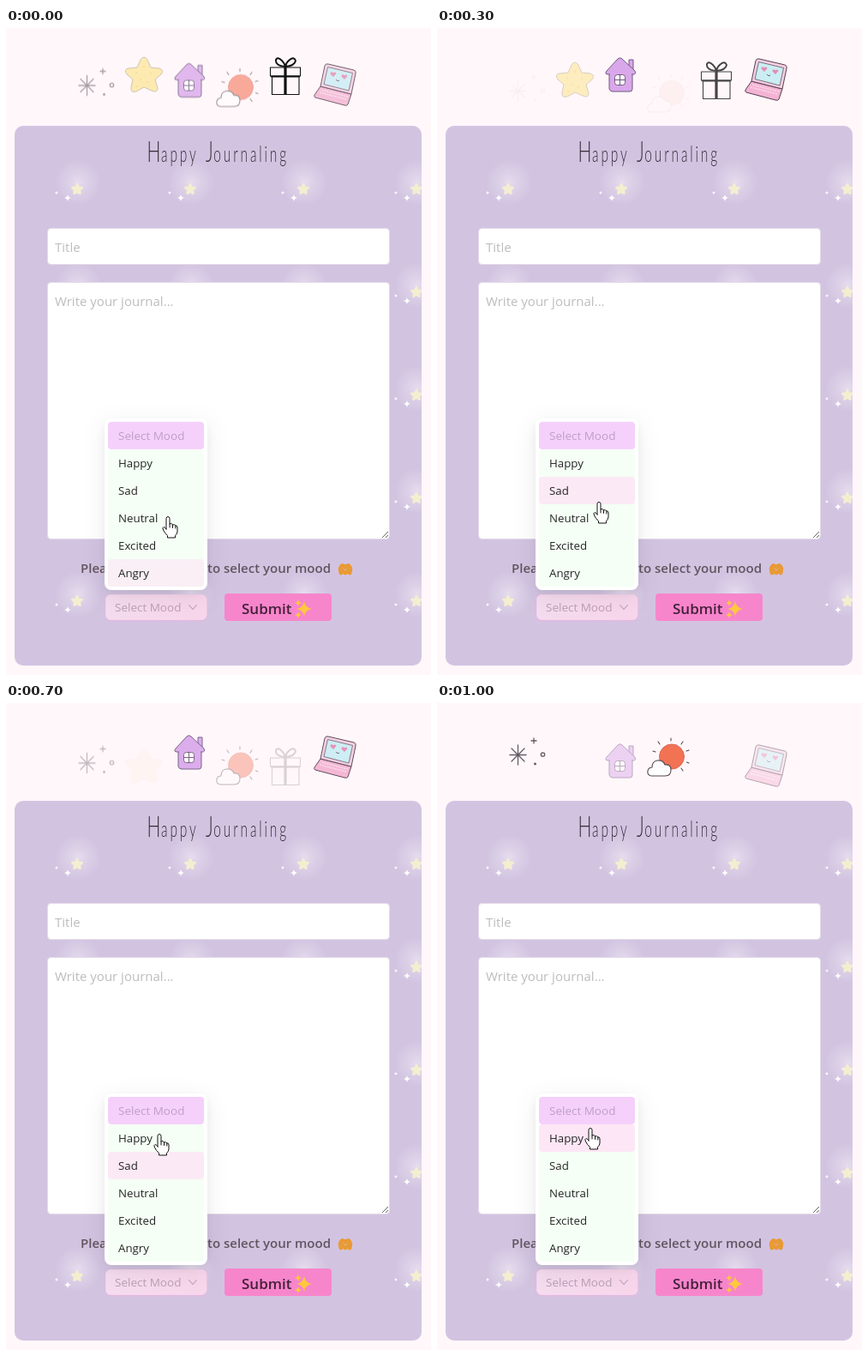
These frames come from a looping animation (496 px wide and 754 px high, 1100 ms). An HTML page:

```html
<!DOCTYPE html>
<html lang="en">
<head>
<meta charset="utf-8">
<title>Journal</title>
<style>
  html, body { margin: 0; width: 100%; height: 100%; overflow: hidden; background: #fff7fa; }
  svg { display: block; width: 496px; height: 754px; }
  text { font-family: "Open Sans", "Noto Sans", sans-serif; white-space: pre; }

  .heading {
    font: 300 25px Lato, "Open Sans", sans-serif;
    letter-spacing: 4.6px;
    fill: #352d38;
  }
  .initial { font-size: 34px; letter-spacing: 1px; }
  .hint { font-size: 15px; fill: #bdbdbd; }
  .note { font-size: 15px; font-weight: 600; fill: #63545f; }
  .submit { font-size: 17px; font-weight: 600; fill: #43203a; }
  .option { font-size: 13.3px; fill: #262626; }
  .muted { font-size: 13.5px; fill: #bd9fc6; }
  .panel {
    filter: drop-shadow(0 4px 6px rgba(0, 0, 0, .05)) drop-shadow(0 7px 14px rgba(0, 0, 0, .07));
  }
  .ink { fill: none; stroke-linecap: round; stroke-linejoin: round; }

  /* Shared float-and-fade; each icon supplies its own offsets and opacities. */
  .icon { animation: float 1.1s infinite; }
  @keyframes float {
    0%     { transform: translateY(var(--y0)); opacity: var(--o0); animation-timing-function: steps(1); }
    9.09%  { transform: translateY(var(--y1)); opacity: var(--o1); animation-timing-function: steps(2); }
    27.27% { transform: translateY(var(--y2)); opacity: var(--o2); animation-timing-function: steps(2); }
    45.45% { transform: translateY(var(--y3)); opacity: var(--o3); animation-timing-function: steps(2); }
    63.63% { transform: translateY(var(--y4)); opacity: var(--o4); animation-timing-function: steps(1); }
    72.72% { transform: translateY(var(--y5)); opacity: var(--o5); animation-timing-function: steps(2); }
    90.9%, 100% { transform: translateY(var(--y6)); opacity: var(--o6); animation-timing-function: steps(1); }
  }
  .twinkle {
    --y0: 6.5px; --y1: 9px; --y2: 13px; --y3: 14px; --y4: 9.5px; --y5: 6.5px; --y6: 0px;
    --o0: .48; --o1: .38; --o2: .04; --o3: 0; --o4: .34; --o5: .46; --o6: .85;
  }
  .star {
    --y0: 0px; --y1: 1px; --y2: 6px; --y3: 13px; --y4: 19px; --y5: 21px; --y6: 22px;
    --o0: 1; --o1: .97; --o2: .8; --o3: .47; --o4: .1; --o5: 0; --o6: 0;
  }
  .house {
    --y0: 6.5px; --y1: 3.5px; --y2: 0px; --y3: 0px; --y4: 3px; --y5: 6px; --y6: 13px;
    --o0: .8; --o1: .9; --o2: 1; --o3: 1; --o4: .93; --o5: .8; --o6: .48;
  }
  .sun {
    --y0: 6.5px; --y1: 9.5px; --y2: 13px; --y3: 14px; --y4: 10px; --y5: 7px; --y6: 0px;
    --o0: .55; --o1: .45; --o2: .05; --o3: 0; --o4: .36; --o5: .52; --o6: .95;
  }
  .gift {
    --y0: 0px; --y1: 1px; --y2: 5px; --y3: 12px; --y4: 18px; --y5: 20px; --y6: 21px;
    --o0: 1; --o1: .97; --o2: .78; --o3: .45; --o4: .16; --o5: .04; --o6: 0;
  }
  .laptop {
    --y0: 6px; --y1: 3.5px; --y2: 0px; --y3: 0px; --y4: 3px; --y5: 6px; --y6: 13px;
    --o0: .82; --o1: .9; --o2: 1; --o3: 1; --o4: .93; --o5: .82; --o6: .45;
  }

  .hover { animation: hover 1.1s step-end infinite; }
  @keyframes hover {
    0%     { transform: translateY(128px); opacity: .6; }
    9.09%  { transform: translateY(96px); opacity: .75; }
    18.18% { transform: translateY(64px); opacity: .8; }
    27.27% { transform: translateY(32px); opacity: .85; }
    45.45% { transform: translateY(32px); opacity: 1; }
    63.63% { transform: translateY(32px); opacity: .85; }
    72.72%, 100% { transform: translateY(0); opacity: 1; }
  }

  .cursor { animation: point 1.1s infinite; }
  @keyframes point {
    0%     { transform: translate(189px, 570px); animation-timing-function: steps(1); }
    9.09%  { transform: translate(189px, 553px); animation-timing-function: steps(2); }
    27.27% { transform: translate(189px, 553px); animation-timing-function: steps(2); }
    45.45% { transform: translate(184px, 531px); animation-timing-function: steps(2); }
    63.63% { transform: translate(179px, 503px); animation-timing-function: steps(1); }
    72.72% { transform: translate(179px, 498px); animation-timing-function: steps(2); }
    90.9%, 100% { transform: translate(179px, 496px); animation-timing-function: steps(1); }
  }
</style>
</head>
<body>
<svg viewBox="0 0 496 754">
  <defs>
    <radialGradient id="glow">
      <stop offset="0" stop-color="#fff" stop-opacity=".42"/>
      <stop offset=".45" stop-color="#fff" stop-opacity=".2"/>
      <stop offset="1" stop-color="#fff" stop-opacity="0"/>
    </radialGradient>
    <linearGradient id="blush" x2="1" y2="0">
      <stop offset="0" stop-color="#f5dcef"/>
      <stop offset="1" stop-color="#f8d6ec"/>
    </linearGradient>
    <path id="spark" d="M0-9Q1.2-1.2 9 0Q1.2 1.2 0 9Q-1.2 1.2-9 0Q-1.2-1.2 0-9Z"/>
    <pattern id="sky" x="10" y="114" width="132" height="120" patternUnits="userSpaceOnUse">
      <circle cx="74" cy="66" r="27" fill="url(#glow)"/>
      <path transform="translate(73 74)" fill="#f4eed0" stroke="#f4eed0" stroke-width="2" stroke-linejoin="round"
        d="M0-6.2L1.9-2.6L6-2L3.1 1L3.7 5L0 3.1L-3.7 5L-3.1 1L-6-2L-1.9-2.6Z"/>
      <use href="#spark" transform="translate(62 84) scale(.45)" fill="#fff"/>
      <use href="#spark" transform="translate(49 78) scale(.22)" fill="#fff"/>
    </pattern>
  </defs>

  <!-- Icons -->
  <g class="icon twinkle ink" stroke="#47414a" stroke-width="1.3">
    <path d="M94.5 49V72M85 60.5H104M87 53L102 68M102 53L87 68M113 41V47M110 44H116"/>
    <circle cx="123.500" cy="60" r="2.200"/>
    <circle cx="114.500" cy="71" r=".8" fill="#47414a"/>
  </g>
  <g class="icon star">
    <path fill="#fdeab0" stroke="#cfc4b3" stroke-linejoin="round"
      d="M157 37Q161 31 165 37L169 46L179 47Q185 49 181 54L174 60L177 70Q177 76 170 73L161 69L152 74Q145 76 146 69L148 60L141 54Q137 48 143 47L153 46Z"/>
    <g fill="#f5dd94">
      <circle cx="152" cy="52" r="1"/><circle cx="161" cy="45" r="1"/><circle cx="169" cy="53" r="1"/>
      <circle cx="157" cy="60" r="1"/><circle cx="165" cy="63" r="1"/><circle cx="153" cy="68" r="1"/>
    </g>
  </g>
  <g class="icon house" stroke="#735880" stroke-linejoin="round">
    <path fill="#d9a8ea" d="M224 46V37H229V50M201 53V71Q202 74 205 74H225Q228 74 228 71V53"/>
    <path fill="#d9a8ea" d="M211 36Q213.500 33.500 216 36L231 50Q233 54 229 54H200Q195 54 198 50Z"/>
    <path fill="#d9a8ea" stroke="none" d="M202 51H227V57H202Z"/>
    <rect x="207.500" y="54.500" width="12" height="12" rx="3" fill="#fff"/>
    <path d="M213.500 55V66M208 60.500H219"/>
  </g>
  <g class="icon sun ink" stroke="#4c4148" stroke-width="1.1">
    <circle cx="274" cy="62.500" r="14.500" fill="#f26b4c" stroke="#d8604a" stroke-width="1"/>
    <path d="M273 41V44M258 45L260 48M287 45L285 48M294 55L291 56M291.500 69L294 70M285 76L287 79M252 56L255 57"/>
    <path fill="#fff" d="M250 85Q245 84 246 79Q247 75 251 75Q251 68 257 67Q264 66 266 72Q273 71 273 78Q273 85 266 85Z"/>
  </g>
  <g class="icon gift ink" stroke="#111" stroke-width="1.1">
    <path d="M308.500 46H343.500V56H308.500ZM310.500 56V77.500H342V56"/>
    <path stroke-width="2.200" d="M310 56.500H342"/>
    <path stroke-width="3.200" stroke-linecap="butt" d="M326 46V77.500"/>
    <path stroke-width="1.900" d="M326 45Q314 44 315 37Q317 33 322 38Q325 41 326 45Q327 40 331 37Q336 33 338 38Q337 44 326 45"/>
  </g>
  <g class="icon laptop" stroke="#55404f" stroke-linejoin="round">
    <path fill="#f3b3d2" d="M367 62L403 71L399 83Q398 85 395 84L361 75Q359 74 360 72Z"/>
    <path fill="#f4cfe2" d="M372 38Q373 35 376 36L406 43Q409 44 408 47L403 71L367 62Z"/>
    <path fill="#cbedf4" stroke-width=".7" d="M375.500 39.500L404.500 46.500L400 67L371 59.500Z"/>
    <path stroke="#fbdbe9" stroke-width="1.5" stroke-dasharray="2 1" d="M368 66L399 74M366 69L397 77"/>
    <g fill="#e58bb2" stroke="none">
      <path id="heart" d="M382 51L378.500 47.500Q378.500 44.500 381 45.500L382 46.500Q384 44.500 385.500 47Z"/>
      <use href="#heart" x="13" y="3"/>
    </g>
    <path fill="none" stroke-width=".8" d="M385 54Q387 57 389 55"/>
  </g>

  <!-- Form -->
  <rect x="10" y="114" width="475" height="629" rx="10" fill="#d2c4e1"/>
  <rect x="10" y="114" width="475" height="629" rx="10" fill="url(#sky)"/>
  <text class="heading" transform="translate(164.500 156) scale(.62 1)"><tspan class="initial">H</tspan>appy</text>
  <text class="heading" transform="translate(233 156) scale(.62 1)"><tspan class="initial">J</tspan>ournaling</text>
  <g fill="#fff" stroke="#e2dae8">
    <rect x="48.500" y="233.500" width="399" height="42" rx="4"/>
    <rect x="48.500" y="296.500" width="399" height="299" rx="4"/>
  </g>
  <path d="M439 594L446 587M443 594L446 591" stroke="#666"/>
  <text class="hint" x="57" y="261">Title</text>
  <text class="hint" x="57" y="324">Write your journal...</text>

  <text class="note" x="87" y="635">Please</text>
  <text class="note" x="235" y="635">to select your mood</text>
  <g class="ink">
    <path id="hands" stroke="#e99a35" stroke-width="4.500"
      d="M396 635Q390 631 391 628Q393 625 396 628.500Q399 625 401 628Q402 631 396 635M390 630L391 635M402 630L401 635"/>
    <use href="#hands" style="stroke: #fcc644; stroke-width: 3px"/>
  </g>

  <rect x="116.500" y="660.500" width="117.500" height="29" rx="5.500" fill="url(#blush)" stroke="#f6d3ec"
    style="filter: drop-shadow(0 1px 1.5px #e6b4de)"/>
  <text class="muted" x="127" y="680" style="fill: #b9a0b6">Select Mood</text>
  <path class="ink" d="M213.500 672.500L218 677.500L222.500 672.500" stroke="#b9a0b6" stroke-width="1.100"/>

  <rect x="255" y="659" width="125" height="32" rx="4" fill="#f785cb"/>
  <text class="submit" x="275" y="683">Submit</text>
  <g fill="#ffc83d">
    <use href="#spark" transform="translate(348 677)"/>
    <use href="#spark" transform="translate(341 670) scale(.45)"/>
    <use href="#spark" transform="translate(341 684) scale(.45)"/>
  </g>

  <!-- Mood menu -->
  <rect class="panel" x="115" y="455" width="120" height="200" rx="8" fill="#fff"/>
  <rect x="119" y="491" width="112" height="160" rx="4" fill="#f5fff5"/>
  <rect x="119" y="459" width="112" height="32" rx="4" fill="#f5d0fb"/>
  <rect class="hover" x="119" y="491" width="112" height="32" rx="4" fill="#fde6f5"/>
  <text class="muted" x="131" y="480">Select Mood</text>
  <text class="option" x="131" y="512">Happy</text>
  <text class="option" x="131" y="544">Sad</text>
  <text class="option" x="131" y="576">Neutral</text>
  <text class="option" x="131" y="608">Excited</text>
  <text class="option" x="131" y="640">Angry</text>

  <g class="cursor ink" stroke="#111">
    <path fill="#fff" d="M-2 14V1.500Q-1.800-.5 0-.5Q1.800-.5 2 1.500V8Q4.500 6.500 5.500 9Q8 8 8.800 10Q11 9.500 11 12V17Q10.500 20 8.500 21.500V24H-.5V21.500Q-3.500 19-5.500 15Q-7 12-5 11.500Q-3.500 11.500-2 14Z"/>
    <path d="M2 8V12M5.500 9V12.500M8.800 10V13"/>
  </g>
</svg>
</body>
</html>
```
